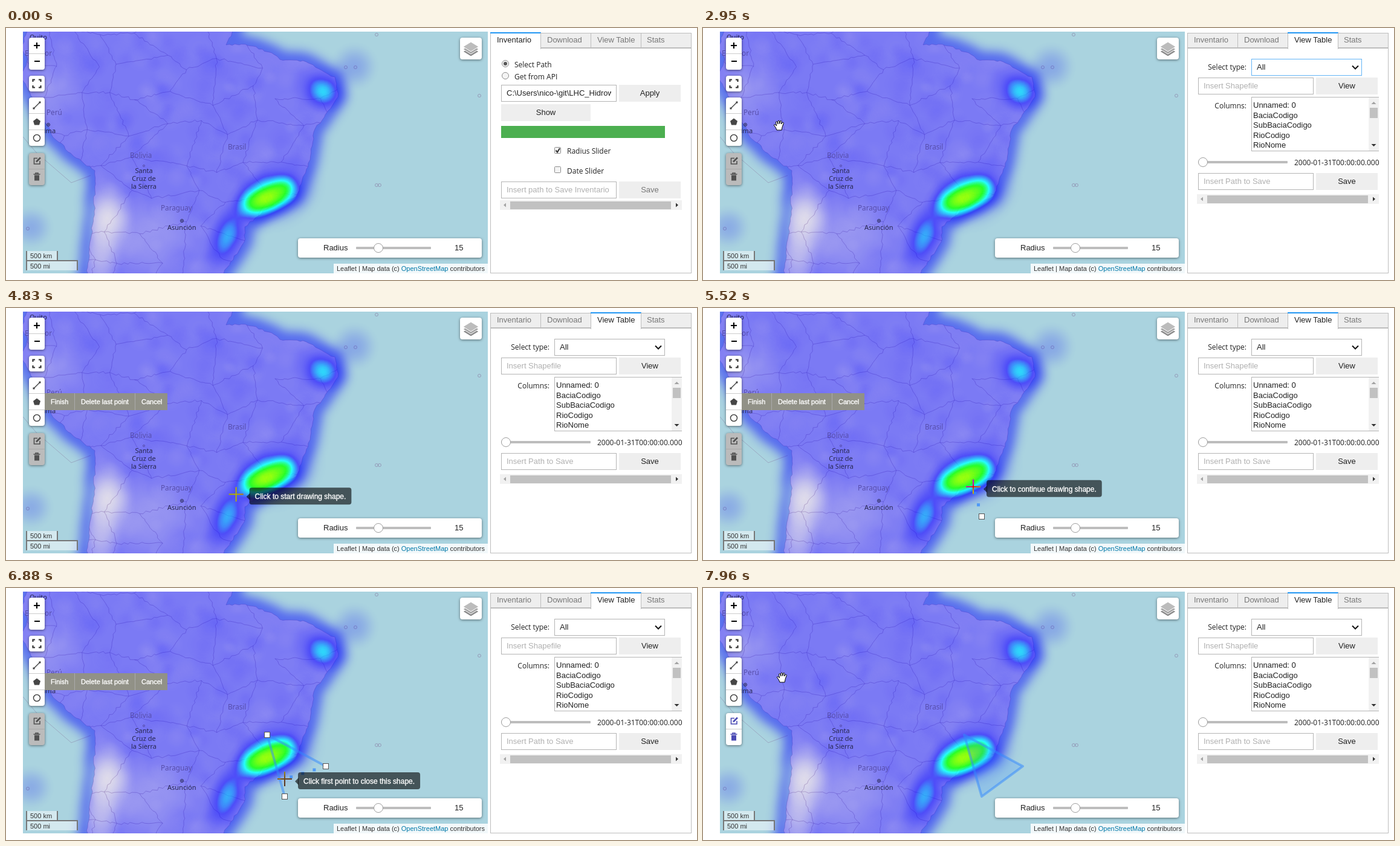
Animation of 1143x417 px, one loop 8000 ms. Source, as an HTML page with a canvas:

```html
<!DOCTYPE html>
<html lang="en">
<head>
<meta charset="utf-8">
<title>Heatmap drawing demo</title>
<style>
html, body { margin: 0; width: 100%; height: 100%; overflow: hidden; background: #fff; }
canvas { position: absolute; left: 28px; top: 6px; }
svg { position: absolute; left: 0; top: 0; }
text { font: 13px "Liberation Sans", Arial, sans-serif; fill: #222; white-space: pre; }
.open { font: 12px "Open Sans", sans-serif; }
.small { font-size: 11px; fill: #333; }
.country { font: 11.7px "Noto Sans", sans-serif; fill: #564dab; }
.city { font: 11px "Noto Sans", sans-serif; fill: #26264f; }
.hint { fill: #b0b0b0; }
.dim { fill: #777; }
.mid { text-anchor: middle; }
.end { text-anchor: end; }
.light { fill: #fff; stroke: #fff; stroke-width: .35px; }
.box { fill: #fff; filter: drop-shadow(0 1px 2px rgba(0,0,0,.5)); }
.field { fill: #fff; stroke: #b4b4b4; }
.line { fill: none; stroke: #464646; stroke-width: 1.5; }
.cursor { fill: #fff; stroke: #000; }
#cross { mix-blend-mode: difference; pointer-events: none; }
</style>
</head>
<body>
<canvas id="map" width="769" height="400"></canvas>
<svg id="ui" width="1143" height="417"></svg>
<svg id="cross" width="1143" height="417"><path d="M-12 0H12M0-12V12" stroke="#fff" stroke-width="2"/></svg>
<script>
const $ = id => document.getElementById(id);
let seed = 11;
const rand = () => (seed = seed * 16807 % 2147483647) / 2147483647;
const mix = (a, b, f) => a + (b - a) * f;

// ---------- Map ----------
const coast = `378,-30 378,2 364,28 396,27 439,41 453,52 491,54 544,81 549,114 509,172 503,218 480,279
  435,296 395,329 394,354 344,430 131,430 146,303 147,236 116,215 78,181 37,102 23,80 36,52 25,33 48,-30`;

// Adds a slightly ragged line from a to b
function ragged(path, [ax, ay], [bx, by], jitter) {
  const n = Math.ceil(Math.hypot(bx - ax, by - ay) / 6);
  for (let k = 1; k <= n; k++) {
    const j = k < n ? jitter : 0;
    path.lineTo(mix(ax, bx, k / n) + (rand() - .5) * j, mix(ay, by, k / n) + (rand() - .5) * j);
  }
}

function makeLand() {
  const land = new Path2D(), points = coast.split(/\s+/).map(p => p.split(',').map(Number));
  land.moveTo(...points[0]);
  points.slice(1).forEach((p, i) => ragged(land, points[i], p, 3));
  land.closePath();
  return land;
}

// Region borders: a loose net of jittered cells with some edges left out
function makeBorders() {
  const net = new Path2D(), cell = 56, nodes = [];
  for (let r = 0; r < 9; r++) {
    nodes.push(Array.from({ length: 11 }, (_, c) =>
      [(c + r % 2 / 2 + (rand() - .5) * .7) * cell, (r + (rand() - .5) * .6) * cell]));
  }
  const edge = (a, b) => {
    if (!b || rand() < .25) return;
    net.moveTo(...a);
    ragged(net, a, b, 4);
  };
  nodes.forEach((row, r) => row.forEach((a, c) => {
    edge(a, row[c + 1]);
    if (r + 1 < nodes.length) edge(a, nodes[r + 1][c]);
  }));
  return net;
}

const heatStops = [[0, 0, 0, 255], [.68, 0, 0, 255], [.84, 0, 255, 255], [.91, 20, 255, 20], [1, 210, 255, 0]];
function heatColor(v) {
  const i = Math.max(1, heatStops.findIndex(s => s[0] >= v));
  const a = heatStops[i - 1], b = heatStops[i], f = (v - a[0]) / (b[0] - a[0]);
  return [1, 2, 3].map(c => mix(a[c], b[c], f));
}

function makeHeat(land) {
  const canvas = document.createElement('canvas');
  canvas.width = 1143; canvas.height = 417;
  const g = canvas.getContext('2d');
  // Soft elliptic spot; a negative strength cools the area
  const spot = (x, y, rx, ry, strength, turn = 0) => {
    g.save();
    g.globalCompositeOperation = strength < 0 ? 'destination-out' : 'source-over';
    g.translate(x, y); g.rotate(turn); g.scale(rx, ry);
    const fade = g.createRadialGradient(0, 0, 0, 0, 0, 1);
    for (let r = 0; r <= 1; r += .125) {
      fade.addColorStop(r, `rgba(0,0,0,${Math.abs(strength) * (1 - r * r) ** 2})`);
    }
    g.fillStyle = fade;
    g.fillRect(-1, -1, 2, 2);
    g.restore();
  };
  g.filter = 'blur(9px)';
  g.lineWidth = 28;
  g.fill(land); g.stroke(land);
  g.filter = 'none';
  g.globalCompositeOperation = 'destination-in';
  g.fillStyle = 'rgba(0,0,0,.49)';
  g.fillRect(0, 0, 1143, 417);
  g.save();
  g.clip(land);
  for (let i = 0; i < 300; i++) {
    const r = 14 + rand() * 16;
    spot(28 + rand() * 500, 6 + rand() * 400, r, r, (i % 2 ? -1 : 1) * (.02 + rand() * .05));
  }
  g.restore();
  spot(168, 315, 48, 70, -.8);
  spot(158, 375, 40, 80, -.5);
  spot(240, 345, 100, 80, -.25);
  spot(75, 95, 60, 60, -.2);
  spot(576, 64, 42, 42, .2);
  spot(42, 330, 38, 38, .18);
  spot(525, 107, 38, 38, .48);
  spot(522, 100, 58, 46, .3, .4);
  spot(450, 272, 85, 65, .3, -.5);
  spot(366, 345, 36, 72, .56, .35);
  spot(431, 281, 72, 48, .93, -.38);
  spot(461, 266, 34, 32, .45);
  spot(404, 292, 34, 30, .4);
  const image = g.getImageData(0, 0, 1143, 417), d = image.data;
  for (let i = 0; i < d.length; i += 4) {
    if (d[i + 3]) [d[i], d[i + 1], d[i + 2]] = heatColor(d[i + 3] / 255);
  }
  g.putImageData(image, 0, 0);
  return canvas;
}

function paintMap() {
  const g = $('map').getContext('2d'), land = makeLand();
  g.translate(-28, -6);
  g.fillStyle = '#aad3df';
  g.fillRect(28, 6, 769, 400);
  g.fillStyle = '#f2efe9';
  g.fill(land);
  const ink = (path, alpha) => { g.strokeStyle = `rgba(115,75,130,${alpha})`; g.stroke(path); };
  ink(land, .3);
  g.save();
  g.clip(land);
  ink(makeBorders(), .35);
  g.restore();
  ink(new Path2D('M28 180L50 206 108 256 140 244'), .3);
  for (const [x, y] of [[562, 65], [578, 65], [613, 11], [783, 112], [613, 260], [618, 260], [36, 332]]) {
    const ring = new Path2D();
    ring.arc(x, y, 2.5, 0, 7);
    ink(ring, .4);
  }
  g.drawImage(makeHeat(land), 0, 0);
}

// ---------- Interface ----------
const rect = (x, y, w, h, attrs = '') => `<rect x="${x}" y="${y}" width="${w}" height="${h}" ${attrs}/>`;
const text = (x, y, s, cls = '') => `<text x="${x}" y="${y}" class="${cls}">${s}</text>`;
const path = (d, attrs = 'class="line"') => `<path d="${d}" ${attrs}/>`;
const circle = (x, y, r, attrs = '') => `<circle cx="${x}" cy="${y}" r="${r}" ${attrs}/>`;
const group = (id, ...parts) => `<g id="${id}">${parts.join('')}</g>`;
const box = (x, y, w, h) => rect(x, y, w, h, 'rx="4" class="box"');
const field = (x, y, w, h, id = '') => rect(x + .5, y + .5, w - 1, h - 1, `class="field" id="${id}"`);
const button = (x, y, w, label, cls = '') => rect(x, y, w, 28, 'fill="#eee"') + text(x + w / 2, y + 18, label, 'mid ' + cls);
const slider = (x, y, w, knob) => rect(x, y - 2, w, 4, 'rx="1" fill="#bdbdbd"') + circle(knob, y, 7.5, 'fill="#fff" stroke="#9e9e9e"');
const scrollbar = y => rect(817, y, 301, 16, 'fill="#f1f1f1"') + rect(834, y + 2, 266, 13, 'fill="#c1c1c1"') +
  path(`M827 ${y + 4.5}v7l-4-3.5z`, 'fill="#a3a3a3"') + path(`M1108 ${y + 4.5}v7l4-3.5z`, 'fill="#333"');

const tabs = active => ['Inventario', 'Download', 'View Table', 'Stats'].map((name, i) => {
  const x = 801 + 83 * i, on = i === active;
  return rect(x + .5, 8.5, 83, on ? 26 : 24, `fill="${on ? '#fff' : '#eee'}" stroke="#bdbdbd"`) +
    (on ? rect(x + 1, 32, 82, 4, 'fill="#fff"') + rect(x, 7, 84, 2, 'fill="#2196f3"') : '') +
    text(x + 11 - (i === 3), 24, name, on ? '' : 'dim');
}).join('');

const labels = text(39, 19, 'Quito', 'city') + text(31, 46, 'Ecuador', 'country') + text(67, 144, 'Perú', 'country') +
  text(57, 174, 'Lima', 'city') + text(205, 215, 'Bolivia', 'country') + text(367, 201, 'Brasil', 'country') +
  text(256, 302, 'Paraguay', 'country') + text(267, 334, 'Asunción', 'city') +
  ['Santa', 'Cruz de', 'la Sierra'].map((s, i) => text(228, 240 + 13 * i, s, 'city mid')).join('') +
  [[70, 160], [291, 319]].map(([x, y]) => circle(x, y, 2.5, 'fill="none" stroke="#26264f"') + circle(x, y, 1, 'fill="#26264f"')).join('') +
  circle(228, 228, 1.5, 'fill="none" stroke="#564dab"');

const editIcons = color => `<g fill="none" stroke="${color}" stroke-width="1.6">` +
  path('M52 215.5H46.5V225H56V220', '') + path('M50 221.5L57 214.5', 'stroke-width="2.6"') +
  path('M45.5 242H56.5M49 241.5V240H53V241.5', '') + rect(47, 243.5, 8, 9, `fill="${color}" stroke="none"`) + '</g>';

const controls = box(38, 16, 26, 53) + path('M38 42.5H64', 'stroke="#ccc"') +
  path('M46 29H56M51 24V34M47 55H56', 'stroke="#000" stroke-width="2"') +
  box(38, 79, 26, 26) + path('M48 85.5H44.5V89M54 85.5H57.5V89M48 98.5H44.5V95M54 98.5H57.5V95', 'fill="none" stroke="#333" stroke-width="2.2"') +
  box(38, 115, 26, 80) + path('M38 141.5H64M38 168.5H64', 'stroke="#ccc"') +
  path('M46 133L56 123') + rect(44.5, 131.5, 3, 3, 'fill="#464646"') + rect(54.5, 121.5, 3, 3, 'fill="#464646"') +
  path('M51 149.5L57 154 55 160.5H47L45 154Z', 'fill="#464646"') + circle(51, 182, 5.5, 'class="line"') +
  group('editOff', rect(38, 207, 26, 53, 'rx="4" class="box" style="fill:#bbb"'), path('M38 233.5H64', 'stroke="#aaa"'), editIcons('#505050')) +
  group('editOn', box(38, 207, 26, 53), path('M38 233.5H64', 'stroke="#ccc"'), editIcons('#4a4ab4')) +
  box(751, 16, 36, 36) +
  ['#8c8c8c', '#a4a4a4', '#bcbcbc'].map((c, i) => path(`M769 ${31 - 4 * i}l13 8-13 8-13-8z`, `fill="${c}" stroke="#fff"`)).join('') +
  box(483, 348, 304, 32) + text(525, 368, 'Radius') + slider(579, 364, 124, 616) + text(742, 368, '15') +
  rect(33, 369, 53, 16, 'fill="#fff" fill-opacity=".5"') + rect(33, 385, 86, 16, 'fill="#fff" fill-opacity=".5"') +
  path('M34 369V401M85 369V385M34 385H118V401', 'fill="none" stroke="#777" stroke-width="2"') +
  text(40, 381, '500 km', 'small') + text(40, 398, '500 mi', 'small') +
  rect(542, 390, 255, 16, 'fill="#fff" fill-opacity=".85"') +
  text(547, 402, 'Leaflet | Map data (c) <tspan fill="#0078a8">OpenStreetMap</tspan> contributors', 'small');

const radio = y => circle(826, y, 5.5, 'fill="#f4f4f4" stroke="#8c8c8c"');
const check = y => rect(907.5, y + .5, 10, 10, 'rx="1" fill="#f4f4f4" stroke="#8c8c8c"');
const inventory = group('inventory', tabs(0), radio(59), circle(826, 59, 3, 'fill="#555"'), radio(79),
  text(841, 65, 'Select Path', 'open'), text(841, 85, 'Get from API', 'open'),
  field(819, 94, 191, 28), `<g clip-path="url(#pathClip)">${text(828, 112, 'C:\\Users\\nico-\\git\\LHC_Hidroweb')}</g>`,
  button(1014, 94, 102, 'Apply'), button(819, 126, 148, 'Show'), rect(819, 162, 271, 20, 'fill="#4caf50"'),
  check(197), path('M909.5 202.5L912 205.5 916 199', 'fill="none" stroke="#333" stroke-width="2"'), check(229),
  text(928, 208, 'Radius Slider', 'open'), text(928, 241, 'Date Slider', 'open'),
  field(819, 254, 191, 28), text(828, 272, 'Insert path to Save Inventario', 'hint'),
  button(1014, 254, 102, 'Save', 'dim'), scrollbar(285));

const columns = ['Unnamed: 0', 'BaciaCodigo', 'SubBaciaCodigo', 'RioCodigo', 'RioNome'];
const table = group('table', tabs(2), text(899, 69, 'Select type:', 'open end'), field(907, 51, 183, 28, 'select'),
  path('M1074 62.5L1079 67.5 1084 62.5', 'fill="none" stroke="#111" stroke-width="2"'), group('chosen', text(916, 69, 'All')),
  field(819, 82, 191, 28), text(828, 100, 'Insert Shapefile', 'hint'), button(1014, 82, 102, 'View'),
  text(899, 133, 'Columns:', 'open end'),
  '<g clip-path="url(#panelClip)">', field(907, 114, 220, 90),
  ...columns.map((s, i) => text(910, 132 + 16.5 * i, s)),
  rect(1101, 115, 17, 88, 'fill="#f1f1f1"'), rect(1103, 132, 13, 17, 'fill="#c1c1c1"'),
  path('M1105.5 126h8l-4-4z', 'fill="#a3a3a3"'), path('M1105.5 192h8l-4 4z', 'fill="#333"'),
  text(978, 227, '2000-01-31T00:00:00.000000', 'open'), '</g>',
  slider(819, 222, 148, 827), field(819, 240, 191, 28), text(828, 258, 'Insert Path to Save', 'hint'),
  button(1014, 240, 102, 'Save'), scrollbar(275),
  group('options', rect(907.5, 78.5, 182, 52, 'fill="#fff" stroke="#888"'), rect(908, 79, 181, 17, 'fill="#1e90ff"'),
    text(916, 92, 'All', 'light'), text(916, 109, 'Year'), text(916, 126, 'Month')));

const menu = group('menu', rect(64, 141, 203, 28, 'fill="#919187"'), path('M113.5 141V169M213.5 141V169', 'stroke="#aaa"'),
  text(74, 159, 'Finish', 'small light'), text(124, 159, 'Delete last point', 'small light'), text(224, 159, 'Cancel', 'small light'));
const title = group('title', rect(60.5, 173.5, 99, 24, 'fill="#fff" stroke="#777"'), text(67, 190, 'Draw a polygon', 'open'));
const tip = group('tip', path('M17 4L23 -2V10Z', 'fill="#000" fill-opacity=".6"'),
  rect(22, -11, 190, 28, 'id="tipBox" rx="4" fill="#000" fill-opacity=".6"'),
  '<text id="tipText" x="31" y="8" class="light" style="font-size:12px"></text>');

const pointers = {
  arrow: 'M0 0V17L4 13.2 6.7 19.2 9.1 18.2 6.5 12.2H12Z',
  point: 'M-1 2.5a1.7 1.7 0 0 1 3.4 0V10q3-1.500 3 .3 2.500-1 2.800.8 2.500 0 2.500 1.500V17c0 3-2 4-2 7H1c0-2-2-4-3.5-6.5L-5 14q0-3 2.200-1.400L-1 14.5z',
  grab: 'M-4 8Q-5 4-8.500 0q0-2.500 2.400-.8L-4.300 1-5.500-5q.5-2.500 2.300-.5L-2-2V-7q1.200-2 2.400 0L.8-2.500 1.800-7q1.500-1.500 2.200.4L3.500-2 5.300-4.500q2-1 2 1.100Q5 2 4 8z'
};

$('ui').innerHTML = `<clipPath id="pathClip">${rect(820, 94, 181, 28)}</clipPath><clipPath id="panelClip">${rect(817, 40, 301, 250)}</clipPath>` +
  labels + group('shape') + controls + rect(801.5, 33.5, 332, 372, 'fill="#fff" stroke="#bdbdbd"') + inventory + table + menu + title + tip +
  circle(-1, 0, 14, 'id="click" fill="#ffee00" fill-opacity=".72"') +
  Object.entries(pointers).map(([id, d]) => group(id, path(d, 'class="cursor"'))).join('');

// ---------- Motion ----------
const LOOP = 8000;
// Each leg eases the pointer to x, y between two times; it rests in between
const legs = [
  { from: 0, to: 140, x: 822, y: 336 },
  { from: 140, to: 680, x: 1008, y: 20 },
  { from: 900, to: 1290, x: 940, y: 67 },
  { from: 1600, to: 1760, x: 935, y: 87 },
  { from: 1910, to: 2770, x: 336, y: 152 },
  { from: 2770, to: 2950, x: 126, y: 161 },
  { from: 2950, to: 3510, x: 51, y: 157 },
  { from: 4430, to: 4990, x: 461, y: 345 },
  { from: 5130, to: 5930, x: 432, y: 243 },
  { from: 6010, to: 6400, x: 529, y: 295 },
  { from: 6520, to: 6880, x: 461, y: 316 },
  { from: 6880, to: 7500, x: 92, y: 156 },
  { from: 7730, to: 7960, x: 131, y: 148 }
];
const clicks = [830, 1540, 1780, 4430, 5040, 5950, 6430, 7730];
const corners = [{ x: 461, y: 345, t: 5060 }, { x: 432, y: 243, t: 5970 }, { x: 529, y: 295, t: 6480 }];
const smooth = f => f * f * (3 - 2 * f);
const within = (t, a, b) => t >= a && t < b;

function pointer(t) {
  let { x, y } = legs[0];
  for (const leg of legs) {
    if (t < leg.from) break;
    const f = smooth(Math.min(1, (t - leg.from) / (leg.to - leg.from)));
    x = mix(x, leg.x, f);
    y = mix(y, leg.y, f);
  }
  return [x, y];
}

function pointerKind(t, x, y, drawing) {
  if (t < 140) return '';
  if (x > 797) return y < 33 ? 'point' : 'arrow';
  if (x < 64) return 'point';
  if (!drawing) return 'grab';
  return x < 267 && within(y, 141, 169) ? 'point' : 'cross';
}

function shapeMarkup(t, x, y) {
  const done = t >= 7730, pts = corners.filter(c => t >= c.t);
  if (!pts.length) return '';
  const d = 'M' + pts.map(p => `${p.x} ${p.y}`).join('L') + (done ? 'Z' : '');
  const stroke = 'stroke="#3388ff" stroke-opacity=".5" stroke-width="4" stroke-linejoin="round"';
  let out = path(d, `${stroke} fill="${done ? '#3388ff' : 'none'}" fill-opacity=".2"`);
  if (done) return out;
  const last = pts[pts.length - 1], length = Math.hypot(x - last.x, y - last.y);
  for (let s = 20; s < length; s += 20) {
    out += rect(mix(last.x, x, s / length) - 2.5, mix(last.y, y, s / length) - 2.5, 5, 5, 'fill="#3388ff" fill-opacity=".75"');
  }
  return out + pts.map(p => rect(p.x - 4.5, p.y - 4.5, 9, 9, 'fill="#fff" stroke="#555"')).join('');
}

const show = (id, on) => { $(id).style.display = on ? '' : 'none'; };

function render(now) {
  const t = now % LOOP, [x, y] = pointer(t), at = `translate(${x} ${y})`;
  const drawing = within(t, 4510, 7730), kind = pointerKind(t, x, y, drawing);
  show('inventory', t < 900);
  show('table', t >= 900);
  show('options', within(t, 1560, 1800));
  show('chosen', t >= 1800);
  $('select').style.stroke = within(t, 1540, 4430) ? '#64b5f6' : '';
  show('title', within(t, 3800, 4430));
  show('menu', drawing);
  show('editOff', t < 7730);
  show('editOn', t >= 7730);
  $('shape').innerHTML = shapeMarkup(t, x, y);

  for (const id of [...Object.keys(pointers), 'click', 'tip']) $(id).setAttribute('transform', at);
  for (const id of [...Object.keys(pointers), 'cross']) show(id, id === kind);
  $('cross').firstElementChild.setAttribute('transform', at);
  show('click', clicks.some(c => within(t, c, c + 150)));
  show('tip', kind === 'cross');
  if (kind === 'cross') {
    $('tipText').textContent = t < corners[0].t ? 'Click to start drawing shape.' :
      t < corners[2].t ? 'Click to continue drawing shape.' : 'Click first point to close this shape.';
    $('tipBox').setAttribute('width', $('tipText').getComputedTextLength() + 18);
  }
}

paintMap();
const start = performance.now();
(function tick() {
  render(performance.now() - start);
  requestAnimationFrame(tick);
})();
</script>
</body>
</html>
```
